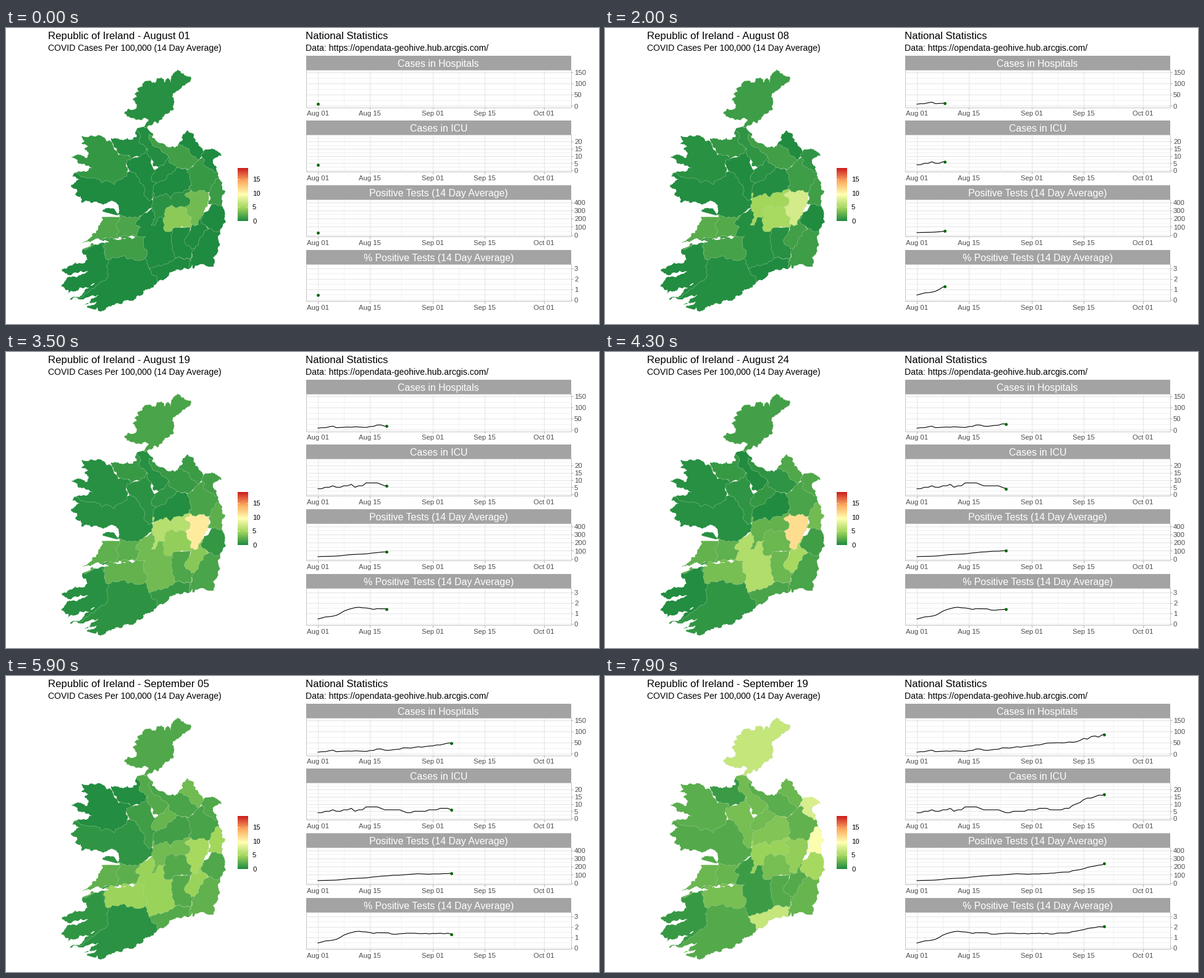
Write a matplotlib script that moves like this. It is 960 by 480 pixels and loops after 8 s.

```python
import numpy as np
import matplotlib.pyplot as plt
from matplotlib.animation import FuncAnimation
from matplotlib.colors import LinearSegmentedColormap
from matplotlib.patches import Polygon, Rectangle

W, H, DPI = 960, 480, 100
FRAMES, STEP = 80, 100
PX = 72 / DPI  # points per pixel

plt.rcParams["font.family"] = "Liberation Sans"
CMAP = LinearSegmentedColormap.from_list(
    "cases", ["#1f8b40", "#a2d75c", "#ffffb2", "#fdae61", "#cc1f1f"])
TOP = 19  # upper end of the colour scale

fig = plt.figure(figsize=(W / DPI, H / DPI), dpi=DPI, facecolor="white")
ax = fig.add_axes([0, 0, 1, 1])
ax.set_xlim(0, W)
ax.set_ylim(H, 0)
ax.axis("off")


def write(x, y, s, size, color="black", ha="left"):
    return ax.text(x, y, s, fontsize=size * PX, color=color, ha=ha,
                   va="baseline")


def rough(pts, amp, depth=2):
    """Wiggle a closed outline; a shared edge wiggles alike in both shapes."""
    for _ in range(depth):
        out = []
        for p, q in zip(pts, pts[1:] + pts[:1]):
            (ax0, ay0), (bx, by) = sorted([p, q])
            mx, my = (ax0 + bx) / 2, (ay0 + by) / 2
            k = amp * np.sin(37.7 * mx + 91.3 * my)
            out += [p, (mx - k * (by - ay0), my + k * (bx - ax0))]
        pts = out
    return pts


# ---------------------------------------------------------------- map
DONEGAL = [
    (277, 67), (283, 72), (290, 77), (299, 79), (299, 86), (290, 93),
    (283, 98), (275, 103), (269, 111), (272, 121), (272, 132), (264, 138),
    (256, 143), (251, 149), (246, 155), (240, 152), (234, 158), (228, 161),
    (222, 160), (227, 154), (230, 148), (225, 146), (215, 149), (206, 146),
    (196, 144), (191, 138), (198, 131), (206, 133), (211, 128), (209, 120),
    (205, 116), (211, 112), (208, 106), (215, 104), (213, 97), (220, 95),
    (223, 88), (233, 85), (241, 89), (244, 82), (252, 80), (257, 88),
    (261, 81), (267, 88), (270, 76)]
EAST = [
    (229, 161), (232, 167), (239, 174), (236, 179), (245, 185), (255, 188),
    (265, 193), (274, 194), (280, 187), (286, 182), (286, 173), (294, 166),
    (300, 170), (305, 179), (311, 187), (316, 194), (319, 201), (328, 197),
    (338, 197), (345, 202), (349, 207), (341, 210), (334, 214), (337, 223),
    (341, 232), (344, 241), (350, 250), (350, 260), (355, 265), (350, 271),
    (350, 283), (353, 294), (354, 307), (350, 323), (345, 336), (346, 350),
    (342, 364), (334, 372), (338, 380), (336, 387), (329, 387), (320, 383),
    (311, 385), (303, 390), (300, 375), (297, 390), (285, 392), (274, 394),
    (264, 397), (259, 406), (248, 409), (244, 414), (238, 421), (230, 423),
    (222, 427), (220, 433), (212, 434), (207, 441), (198, 441)]
SOUTHWEST = [
    (188, 447), (176, 449), (163, 453), (151, 460), (148, 453), (138, 456),
    (128, 457), (137, 450), (147, 444), (138, 447), (126, 449), (137, 441),
    (150, 433), (138, 434), (126, 440), (104, 441), (112, 436), (127, 428),
    (144, 414), (128, 420), (112, 427), (99, 431), (102, 425), (89, 419),
    (96, 410), (109, 403), (122, 400), (134, 395), (120, 394), (107, 399),
    (95, 397), (91, 391), (102, 386), (112, 380), (121, 382), (132, 376),
    (130, 368), (123, 364), (126, 358), (137, 354), (139, 349), (152, 349),
    (165, 348), (180, 344), (196, 340), (211, 339)]
WEST = [
    (206, 337), (185, 338), (176, 341), (163, 345), (151, 342), (137, 347),
    (123, 349), (136, 341), (146, 332), (150, 320), (157, 311), (153, 303),
    (157, 295), (167, 292), (176, 294), (181, 303), (184, 296), (181, 286),
    (166, 282), (150, 284), (139, 284), (130, 280), (122, 283), (121, 273),
    (112, 270), (115, 262), (105, 255), (113, 250), (120, 246), (107, 240),
    (115, 234), (130, 233), (141, 226), (133, 223), (118, 220), (116, 214),
    (105, 210), (114, 206), (127, 208), (131, 211), (134, 203), (127, 196),
    (133, 192), (121, 188), (127, 183), (122, 175), (134, 177), (145, 176),
    (157, 177), (163, 184), (170, 179), (184, 181), (196, 178), (205, 181),
    (212, 176), (210, 168), (215, 162), (222, 160)]

# cases at KEYS, then an outline; later counties cover earlier ones
KEYS = [0, 14, 27, 43, 59, 68, 79]
COUNTIES = []


def county(cases, *pts):
    COUNTIES.append((cases, list(pts)))


# Cork
county([0, .1, .4, .7, .5, .6, 2],
       (80, 340), (260, 340), (260, 470), (80, 470))
# Kerry
county([0, 0, .4, .2, .7, 1, .9],
       (80, 340), (159, 340), (159, 366), (165, 376), (162, 386), (164, 396),
       (165, 405), (155, 410), (148, 417), (143, 422), (132, 429),
       (114, 438), (102, 434), (80, 433))
# Clare, in two parts
CLARE = [1.8, 2, 2.2, 2.5, 2.4, 2.4, 2.8]
county(CLARE, (110, 285), (225, 285), (225, 338), (180, 342), (110, 355))
county([v * .93 for v in CLARE],
       (183, 285), (225, 285), (225, 338), (180, 341), (183, 328), (179, 317),
       (184, 306))
# Tipperary
county([0, .1, .5, 5.5, 4.5, 2.4, 1.1],
       (238, 285), (222, 300), (212, 312), (211, 320), (218, 323), (213, 331),
       (212, 338), (222, 346), (222, 360), (226, 374), (228, 382), (234, 392),
       (280, 385), (280, 310), (248, 285))
# Galway
county([0, .1, .3, .3, .6, 1.4, 2],
       (95, 235), (205, 230), (240, 262), (236, 275), (238, 289), (230, 295),
       (222, 302), (213, 308), (200, 306), (190, 305), (180, 304), (95, 298))
# Limerick
county([1.2, 1.1, 1.8, 3.2, 4.6, 4.8, 3.2],
       (160, 343), (158, 355), (160, 367), (165, 376), (180, 373), (190, 369),
       (198, 375), (212, 377), (225, 373), (227, 359), (222, 350), (226, 338),
       (214, 338), (200, 339), (180, 342))
# Waterford
county([0, 0, .1, 1.6, 2, 4, 6.5],
       (232, 389), (245, 385), (255, 384), (265, 378), (275, 373), (281, 371),
       (290, 375), (299, 374), (303, 398), (262, 415), (247, 412), (243, 402),
       (235, 398))
# Kilkenny
county([0, 0, .7, 2.8, 2, 2.2, 2],
       (262, 315), (270, 330), (268, 343), (270, 354), (273, 366), (275, 373),
       (281, 371), (290, 375), (299, 374), (306, 360), (306, 315))
# Wexford
county([0, .8, 1.6, 1.6, 2.4, 2.2, 2.6],
       (299, 398), (298, 382), (299, 374), (301, 362), (307, 354), (313, 330),
       (362, 310), (362, 398))
# Carlow
county([0, .2, 2.6, 5, 4.5, 2, 2],
       (298, 310), (299, 325), (294, 336), (290, 342), (292, 352), (300, 359),
       (307, 354), (313, 344), (319, 337), (328, 325), (324, 316), (320, 300))
# Wicklow
county([0, 0, .3, 1.2, 1.8, 3, 5],
       (335, 270), (318, 300), (315, 311), (322, 319), (328, 325), (338, 330),
       (349, 326), (365, 322), (365, 275))
# Offaly
county([.5, 1.2, 9, 2.5, 3, 4, 4.5],
       (236, 260), (233, 270), (238, 283), (236, 292), (241, 300), (238, 311),
       (235, 319), (242, 319), (246, 308), (256, 306), (262, 315), (280, 310),
       (300, 290), (298, 255))
# Laois
county([4, 4.6, 5.6, 2.8, 2, 2.6, 3.2],
       (257, 299), (254, 312), (256, 328), (269, 328), (280, 323), (289, 324),
       (300, 322), (306, 314), (302, 290), (290, 291), (283, 289), (275, 293),
       (268, 287), (260, 291))
# Kildare
county([3, 5, 9.8, 11.5, 5, 4.5, 4.2],
       (298, 283), (290, 290), (293, 300), (300, 307), (299, 318), (306, 321),
       (312, 319), (315, 309), (322, 294), (326, 283), (328, 271), (322, 260),
       (300, 258), (289, 270))
# Roscommon
county([0, 0, .3, .6, 1.2, 1.5, 3.2],
       (203, 234), (215, 243), (219, 252), (224, 259), (223, 269), (230, 279),
       (238, 276), (241, 262), (250, 235), (232, 195), (224, 197), (215, 209),
       (206, 211), (195, 214), (197, 227))
# Mayo
county([.8, .5, .3, .3, .2, .6, 2.2],
       (206, 211), (195, 215), (197, 227), (196, 240), (182, 246), (175, 254),
       (167, 249), (155, 251), (148, 245), (131, 243), (117, 236), (95, 238),
       (95, 165), (169, 165), (172, 186), (182, 206))
# Sligo
county([.2, .6, 1, .9, .2, .1, 1],
       (170, 165), (172, 186), (179, 195), (185, 205), (197, 206), (204, 212),
       (215, 209), (224, 204), (230, 195), (230, 170), (214, 155))
# Leitrim
county([.2, .6, .6, .1, 2, 4.5, 3],
       (212, 157), (218, 175), (216, 186), (227, 194), (228, 204), (235, 212),
       (238, 224), (247, 227), (270, 210), (245, 170), (232, 155))
# Longford
county([.1, .2, .5, .8, 2.6, 4, 3],
       (247, 226), (239, 236), (237, 249), (245, 255), (262, 246), (280, 236),
       (275, 215), (262, 203), (258, 216))
# Cavan
county([1.3, 1.4, 1.2, .6, 1.6, 1.3, 2.2],
       (232, 172), (236, 187), (247, 194), (257, 203), (262, 207), (264, 218),
       (270, 221), (276, 226), (283, 228), (295, 230), (304, 222), (312, 216),
       (316, 205), (290, 180))
# Monaghan
county([0, 0, .3, 1.8, 3, 2.2, 2.8],
       (279, 189), (288, 194), (297, 196), (304, 208), (313, 214), (322, 207),
       (325, 200), (310, 160), (280, 160))
# Westmeath
county([0, .2, .2, .1, 1.3, 2.3, 3.6],
       (242, 253), (251, 248), (260, 243), (270, 234), (277, 226), (283, 228),
       (293, 230), (310, 240), (300, 254), (296, 261), (287, 266), (276, 267),
       (267, 278), (260, 268), (248, 272), (238, 276), (238, 262))
# Meath
county([.9, .9, 1.4, 1.6, 1.5, 2.3, 2.4],
       (293, 230), (304, 222), (308, 217), (313, 213), (345, 212), (355, 240),
       (345, 265), (325, 267), (314, 263), (301, 265), (296, 261), (300, 254),
       (297, 243))
# Louth
county([0, .3, 1, 1.8, 1.8, 4, 7.5],
       (325, 190), (320, 201), (316, 208), (322, 214), (320, 222), (329, 228),
       (338, 234), (362, 232), (362, 190))
# Dublin
county([1, 1, 1.5, 3, 4.8, 6.8, 9.3],
       (365, 243), (341, 244), (336, 253), (331, 262), (328, 269), (331, 277),
       (326, 284), (340, 285), (349, 288), (365, 285))

EDGE = dict(edgecolor="#c4dcb4", linewidth=.35 * PX)
coast = Polygon(rough(EAST + SOUTHWEST + WEST, .2, 3),
                transform=ax.transData)
shapes = []
for cases, pts in COUNTIES:
    shape = ax.add_patch(Polygon(rough(pts, .2), **EDGE))
    shape.set_clip_path(coast)
    shapes.append((shape, cases))
donegal = ax.add_patch(Polygon(rough(DONEGAL, .2, 3), **EDGE))
shapes.append((donegal, [.3, .6, 1.8, 1.4, 1.8, 2.2, 6.5]))

# colour bar
ax.imshow(np.linspace(1, 0, 200)[:, None], cmap=CMAP, vmin=0, vmax=1,
          extent=(375, 392, 313, 227), aspect="auto")
ax.set_xlim(0, W)
ax.set_ylim(H, 0)
for v in (0, 5, 10, 15):
    y = 312.8 - v * 4.52
    for x in (375, 388.6):
        ax.plot([x, x + 3.4], [y, y], color="white", lw=.5 * PX)
    write(399, y + 4.2, str(v), 11.2)

title = write(68, 18, "", 16.8)
write(68, 37, "COVID Cases Per 100,000 (14 Day Average)", 14)
write(485, 18, "National Statistics", 16.8)
write(485, 37, "Data: https://opendata-geohive.hub.arcgis.com/", 14)

# ---------------------------------------------------------------- panels
DAY0, DAY_PX = 505, 6.0
HOSPITAL = [8, 10, 10, 14, 17, 10, 11, 12, 13, 12, 14, 13, 12, 11, 15, 16, 22,
            22, 17, 16, 18, 20, 21, 27, 27, 26, 29, 32, 30, 33, 35, 36, 40,
            40, 44, 48, 49, 49, 50, 49, 50, 53, 52, 54, 60, 69, 66, 77, 80,
            75, 85, 90]
ICU = [4, 4, 5, 5, 6, 5, 5, 6, 6, 7, 5, 6, 6, 8, 8, 8, 8, 7, 6, 6, 6, 6, 6,
       5, 4, 4, 5, 5, 5, 5, 6, 6, 6, 7, 7, 7, 6, 6, 6, 6, 7, 7, 9, 10, 11,
       13, 14, 14, 15, 16, 16, 17]
TESTS = [28, 30, 31, 32, 33, 35, 39, 44, 50, 53, 56, 58, 60, 62, 68, 74, 77,
         83, 86, 88, 93, 95, 95, 99, 103, 106, 110, 113, 111, 109, 107, 110,
         111, 111, 115, 115, 119, 120, 127, 131, 133, 133, 150, 156, 164,
         174, 190, 200, 208, 217, 222, 248]
SHARE = [.45, .54, .64, .67, .72, .8, .98, 1.2, 1.34, 1.44, 1.53, 1.57, 1.52,
         1.5, 1.45, 1.36, 1.44, 1.42, 1.42, 1.41, 1.3, 1.28, 1.33, 1.35,
         1.38, 1.38, 1.38, 1.35, 1.34, 1.36, 1.32, 1.36, 1.35, 1.38, 1.33,
         1.38, 1.3, 1.32, 1.4, 1.4, 1.4, 1.42, 1.54, 1.58, 1.66, 1.72, 1.83,
         1.88, 1.92, 2, 1.98, 2.12]
# title, series, tick step, tick count, zero line, pixels per unit
PANELS = [
    ("Cases in Hospitals", HOSPITAL, 50, 4, 126.4, .3645),
    ("Cases in ICU", ICU, 5, 5, 231.2, 2.37),
    ("Positive Tests (14 Day Average)", TESTS, 100, 5, 335.6, .1325),
    ("% Positive Tests (14 Day Average)", SHARE, 1, 4, 440.6, 17.0),
]
LEFT, RIGHT = 486, 914.5
DATES = [(0, "Aug 01"), (14, "Aug 15"), (31, "Sep 01"), (45, "Sep 15"),
         (61, "Oct 01")]
MAJOR, MINOR, TICK = "#e4e4e4", "#f1f1f1", "#b3b3b3"


def rule(x0, y0, x1, y1, color):
    ax.plot([x0, x1], [y0, y1], color=color, lw=PX, snap=True,
            solid_capstyle="butt")


def panel(i, name, series, step, count, zero, unit):
    top = 45 + 104.9 * i
    body, bottom = top + 23, top + 83.5
    ticks = [zero - k * step * unit for k in range(count)]
    days = [DAY0 + d * DAY_PX for d, _ in DATES]
    for y in ticks:
        minor = y - step * unit / 2
        if minor > body:
            rule(LEFT, minor, RIGHT, minor, MINOR)
    for a, b in zip(days, days[1:]):
        rule((a + b) / 2, body, (a + b) / 2, bottom, MINOR)
    for k, y in enumerate(ticks):
        rule(LEFT, y, RIGHT, y, MAJOR)
        rule(RIGHT, y, RIGHT + 3.5, y, TICK)
        write(920, y + 4.2, str(k * step), 11.2, "#4d4d4d")
    for x, (_, label) in zip(days, DATES):
        rule(x, body, x, bottom, MAJOR)
        rule(x, bottom, x, bottom + 3.5, TICK)
        write(x, bottom + 14, label, 11.2, "#4d4d4d", "center")
    ax.add_patch(Rectangle((LEFT, body), RIGHT - LEFT, bottom - body,
                           fill=False, edgecolor="#c4c4c4", lw=PX, snap=True))
    ax.add_patch(Rectangle((LEFT - .5, top), RIGHT - LEFT + 1, 23.4,
                           color="#a3a3a3", lw=0))
    write((LEFT + RIGHT) / 2, top + 18.2, name, 15.9, "white", "center")
    ys = zero - np.array(series) * unit
    line, = ax.plot([], [], color="black", lw=1.1 * PX, zorder=5)
    dot, = ax.plot([], [], "o", color="#006400", ms=4.8 * PX, mew=0, zorder=6)
    return ys, line, dot


tracks = [panel(i, *p) for i, p in enumerate(PANELS)]


# ---------------------------------------------------------------- motion
def date_name(day):
    month, d = ("August", day + 1) if day < 31 else ("September", day - 30)
    return f"Republic of Ireland - {month} {d:02d}"


def draw(n):
    for shape, cases in shapes:
        shape.set_facecolor(CMAP(np.interp(n, KEYS, cases) / TOP))
    title.set_text(date_name(max(0, round(41.52 + .725 * (n - 68)))))
    day = max(0, round(2 * (3 + .731 * (n - 14))) / 2)
    for ys, line, dot in tracks:
        end = np.interp(day, np.arange(len(ys)), ys)
        full = int(day) + 1
        xs = DAY0 + DAY_PX * np.append(np.arange(full), day)
        line.set_data(xs, np.append(ys[:full], end))
        dot.set_data([xs[-1]], [end])
    return []


anim = FuncAnimation(fig, draw, frames=FRAMES, interval=STEP, repeat=True,
                     repeat_delay=0, init_func=lambda: draw(0), blit=False)
plt.show()
```
